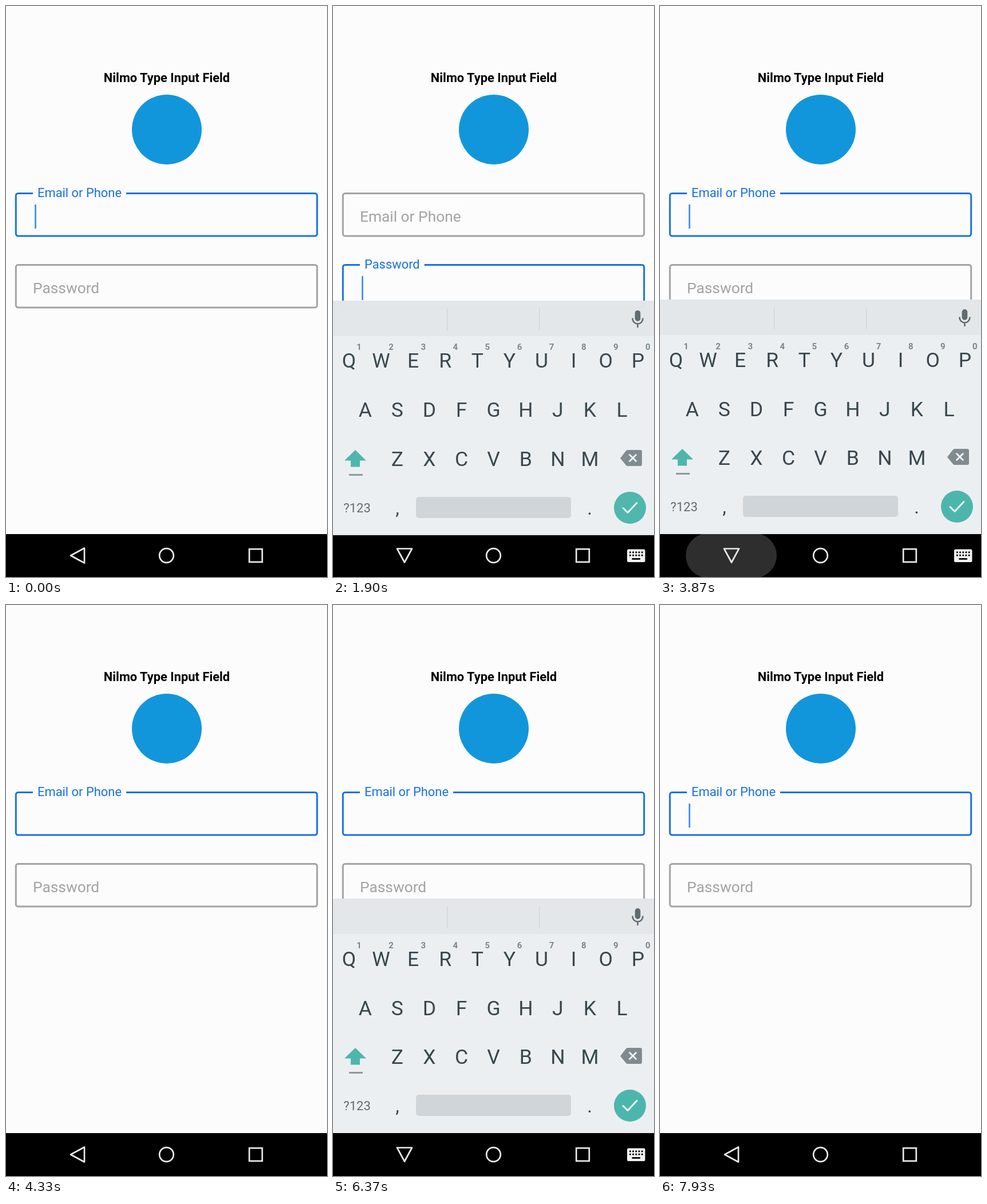
Animation, 561 px wide and 998 px high, one loop 8000 ms. Source, as an HTML page:

```html
<!DOCTYPE html>
<html lang="en">
<head>
<meta charset="utf-8">
<title>Floating label input</title>
<style>
  html, body { margin: 0; width: 100%; height: 100%; overflow: hidden; background: #fcfcfc; }
  svg { display: block; width: 561px; height: 998px; font-family: Roboto, sans-serif; }
  .mid { text-anchor: middle; }
  .line { fill: none; stroke-linecap: round; stroke-linejoin: round; }
</style>
</head>
<body>
<svg id="stage" viewBox="0 0 561 998"></svg>
<script>
const LOOP = 8000;
const BLUE = '#1a70e3', GREY = '#a3a3a3', PAPER = '#fcfcfc', TEAL = '#4db6ac', INK = '#37474f';

// Timeline, in ms
const FOCUS = [[0, 'email'], [1430, 'password'], [2570, 'email'], [4700, 'password'], [5870, 'email']];
const CARET_OFF = [[600, 1100], [2370, 2570], [3070, 3570], [4070, 4570], [5700, 5870], [6370, 6870], [7370, 7870]];
const KEYBOARD = [[1771, 3910], [5041, 7510]];
const BACK_PRESS = [3730, 7330];
const LABEL_MS = 240, SHOW_MS = 226, HIDE_MS = 200, SLIDE = 140;

const stage = document.getElementById('stage');
const clamp = x => Math.max(0, Math.min(1, x));
const mix = (a, b, p) => a + (b - a) * p;
const easeInOut = p => p < .5 ? 2 * p * p : 1 - 2 * (1 - p) ** 2;
const within = (t, spans) => spans.some(([a, b]) => t >= a && t < b);

function set(el, attrs) {
  for (const k in attrs) el.setAttribute(k, attrs[k]);
  return el;
}
function add(parent, tag, attrs = {}, text) {
  const el = set(document.createElementNS('http://www.w3.org/2000/svg', tag), attrs);
  if (text !== undefined) el.textContent = text;
  parent.appendChild(el);
  return el;
}
function rect(parent, x, y, width, height, fill, rx = 0) {
  return add(parent, 'rect', { x, y, width, height, fill, rx });
}
function midText(parent, x, y, size, fill, text, weight = 400) {
  return add(parent, 'text', { x, y, fill, class: 'mid', 'font-size': size, 'font-weight': weight }, text);
}
function line(parent, d, stroke, width) {
  return add(parent, 'path', { d, stroke, 'stroke-width': width, class: 'line' });
}

function makeField(name, text, top) {
  const box = add(stage, 'rect', { x: 17.3, y: top + 1.5, width: 526.4, height: 74.5, rx: 4, fill: 'none', 'stroke-width': 3 });
  const patch = add(stage, 'rect', { fill: PAPER });
  const label = add(stage, 'text', {}, text);
  const caret = rect(stage, 50.2, top + 21, 2.6, 42, '#3b86e4');

  return (focused, amount, caretOn) => {
    const color = focused ? BLUE : GREY;
    const size = mix(26.3, 21.9, amount);
    const x = mix(47, 55, amount);
    const base = top + mix(51.3, 7.8, amount);
    set(box, { stroke: color });
    set(label, { x, y: base, 'font-size': size, fill: color });
    set(patch, { x: x - 8, y: base - size * .93, width: label.getComputedTextLength() + 16, height: size * 1.17 });
    caret.style.display = focused && caretOn ? '' : 'none';
  };
}

function makeKeyboard() {
  const g = add(stage, 'g');
  rect(g, 0, 513, 561, 63, '#e4e7e9');
  rect(g, 0, 575, 561, 349, '#eceff1');
  rect(g, 0, 923, 561, 75, '#000');
  for (const x of [199, 360]) rect(g, x, 527, 1.2, 38, '#cdd2d5');

  rect(g, 527.7, 530, 9.6, 19, '#5f6b70', 4.8);
  line(g, 'M523.5 544.5a9 9 0 0 0 18 0M532.5 554v5', '#5f6b70', 2.6);

  const step = 56.1;
  const rows = [['QWERTYUIOP', 28, 630.5], ['ASDFGHJKL', 56.3, 716.5], ['ZXCVBNM', 112.3, 802]];
  for (const [keys, x, y] of rows)
    [...keys].forEach((key, i) => midText(g, x + i * step, y, 35.5, INK, key));
  [...'1234567890'].forEach((n, i) => midText(g, 45.5 + i * step, 599.5, 15, '#7b878c', n, 700));

  add(g, 'path', { d: 'M39 774l19 18.5h-11v11h-16v-11h-11z', fill: TEAL });
  rect(g, 28, 816, 24, 3, '#8c979b');

  add(g, 'path', { d: 'M502 788.5l10-13q1-1.5 3-1.5h22q3 0 3 3v22q0 3-3 3h-22q-2 0-3-1.5z', fill: '#7f8b90' });
  line(g, 'M518.5 782.5l11 11m0-11l-11 11', '#f4f6f7', 2.8);

  midText(g, 42, 883, 22, '#5f6b71', '?123');
  midText(g, 112.5, 887, 33, INK, ',');
  midText(g, 448.5, 887, 33, INK, '.');
  rect(g, 145, 856, 271, 37, '#cfd5d8', 5);
  add(g, 'circle', { cx: 519, cy: 875, r: 28, fill: TEAL });
  line(g, 'M507 875.5l8 8l16-17', '#fff', 2.8);
  return g;
}

function makeNav() {
  const clip = add(add(stage, 'defs'), 'clipPath', { id: 'bar' });
  rect(clip, 0, 923, 561, 75, '#000');
  const press = rect(add(stage, 'g', { 'clip-path': 'url(#bar)' }), -79.5, -39, 159, 78, '#fff', 39);

  const icon = '#e9e9e9';
  const back = line(stage, 'M-12 0L12 -13V13Z', icon, 2.7);
  add(stage, 'circle', { cx: 280.5, cy: 960.5, r: 12.3, fill: 'none', stroke: icon, 'stroke-width': 2.7 });
  add(stage, 'rect', { x: 425.2, y: 949.2, width: 22.6, height: 22.6, fill: 'none', stroke: icon, 'stroke-width': 2.7 });

  // Keyboard glyph with the keys cut out
  let d = 'M516.5 949.5h26.5q2.5 0 2.5 2.5v17.5q0 2.5-2.5 2.5h-26.5q-2.5 0-2.5-2.5v-17.5q0-2.5 2.5-2.5z';
  for (const y of [953.5, 958.8])
    for (let i = 0; i < 5; i++) d += `M${518 + i * 5.2} ${y}h2.8v2.8h-2.8z`;
  d += 'M522.5 965h14.5v2.8h-14.5z';
  const switcher = add(stage, 'path', { d, fill: '#f2f2f2', 'fill-rule': 'evenodd' });
  return { press, back, switcher };
}

rect(stage, 0, 0, 561, 998, PAPER);
midText(stage, 281, 132.5, 21.9, '#000', 'Nilmo Type Input Field', 700);
add(stage, 'circle', { cx: 281, cy: 216, r: 61, fill: '#1296db' });
const drawField = {
  email: makeField('email', 'Email or Phone', 326),
  password: makeField('password', 'Password', 451)
};
rect(stage, 0, 923, 561, 75, '#000');
const keyboard = makeKeyboard();
const nav = makeNav();

function shownAmount(t) {
  for (const [show, hide] of KEYBOARD) {
    if (t < show || t > hide + HIDE_MS) continue;
    return t < hide
      ? 1 - (1 - clamp((t - show) / SHOW_MS)) ** 5
      : 1 - clamp((t - hide) / HIDE_MS) ** 5;
  }
  return 0;
}

function draw(t) {
  const [since, active] = FOCUS.filter(([at]) => at <= t).pop();
  const moved = since ? easeInOut(clamp((t - since) / LABEL_MS)) : 1;
  const caretOn = !within(t, CARET_OFF);
  for (const name in drawField) {
    const focused = name === active;
    drawField[name](focused, focused ? moved : 1 - moved, caretOn);
  }

  const shown = shownAmount(t);
  set(keyboard, { opacity: shown, transform: `translate(0 ${SLIDE * (1 - shown)})` });

  const open = within(t, KEYBOARD.map(([a, b]) => [a + 25, b + 20]));
  set(nav.back, { transform: `translate(125 960.5) rotate(${open ? -90 : 0})` });
  nav.switcher.style.display = open ? '' : 'none';

  const held = t - (BACK_PRESS.filter(at => at <= t).pop() ?? -LOOP);
  const scale = mix(.5, 1, 1 - (1 - clamp(held / 140)) ** 3);
  const fade = 1 - clamp((held - 150) / 450);
  set(nav.press, { opacity: .18 * fade, transform: `translate(124.5 960.5) scale(${scale})` });
}

function tick() {
  draw(performance.now() % LOOP);
  requestAnimationFrame(tick);
}
tick();
</script>
</body>
</html>
```
